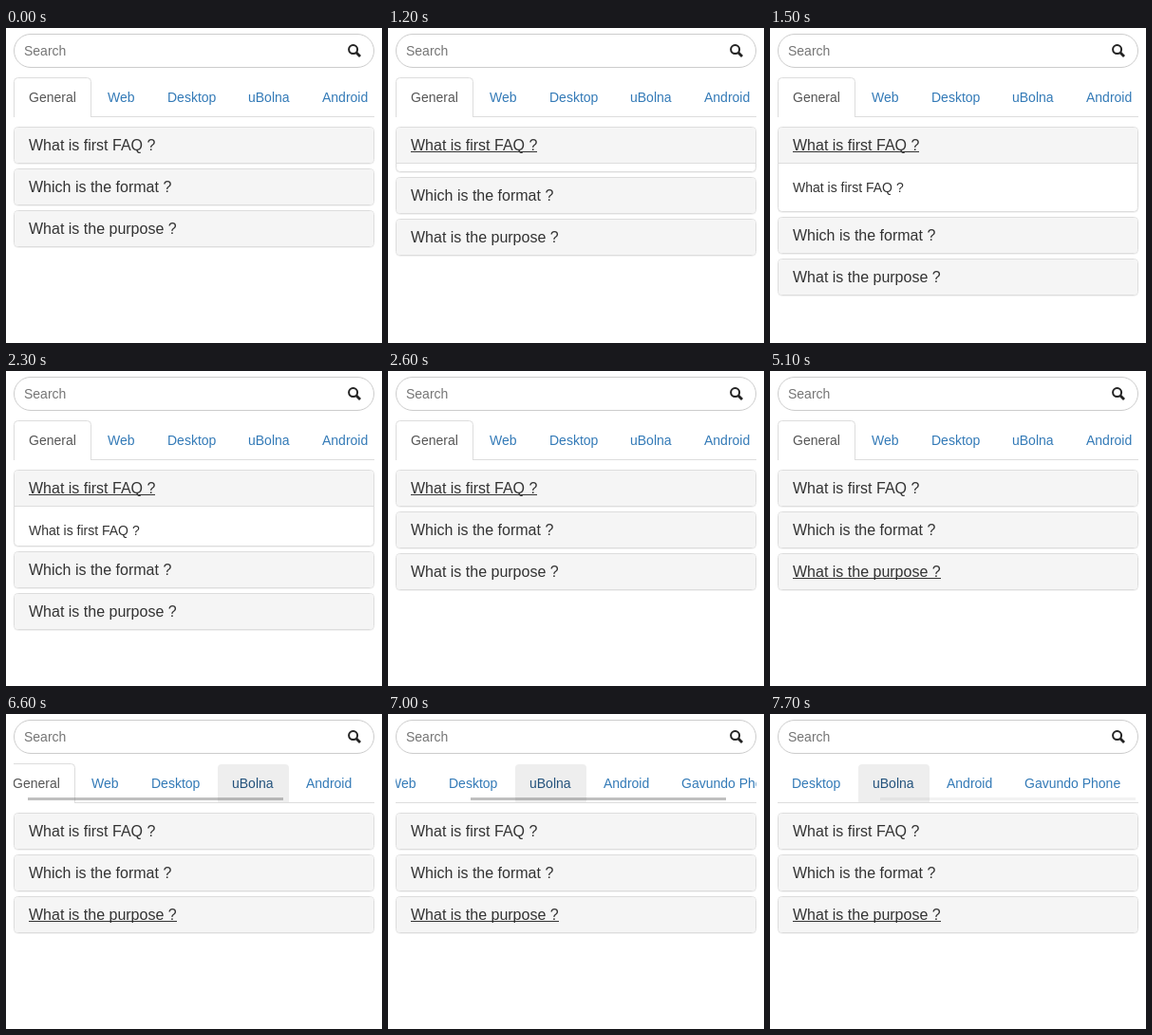
Write an HTML page with a canvas that moves like this. It is 396 px wide and 332 px high and loops after 8000 ms.

```html
<!DOCTYPE html>
<html lang="en">
<head>
<meta charset="utf-8">
<title>FAQ accordion</title>
<style>
  html, body { margin: 0; width: 100%; height: 100%; overflow: hidden; background: #fff; }
  canvas { display: block; }
</style>
</head>
<body>
<canvas id="stage" width="396" height="332"></canvas>
<script>
const ctx = document.getElementById('stage').getContext('2d');
const LOOP = 8000, STEP = 100;
const LEFT = 8, RIGHT = 388, WIDTH = RIGHT - LEFT;
const BODY_HEIGHT = 51, MAX_SCROLL = 147;
const TABS = ['General', 'Web', 'Desktop', 'uBolna', 'Android', 'Gavundo Phone'];
const QUESTIONS = ['What is first FAQ ?', 'Which is the format ?', 'What is the purpose ?'];

const clamp = v => Math.min(1, Math.max(0, v));

// CSS "ease": cubic-bezier(.25, .1, .25, 1)
function ease(x) {
  if (x <= 0 || x >= 1) return clamp(x);
  const bezier = (u, a, b) => 3 * u * (1 - u) ** 2 * a + 3 * u * u * (1 - u) * b + u ** 3;
  let lo = 0, hi = 1;
  for (let i = 0; i < 20; i++) {
    const mid = (lo + hi) / 2;
    if (bezier(mid, .25, .25) < x) lo = mid; else hi = mid;
  }
  return bezier(lo, .1, 1);
}

function text(str, x, y, size, color) {
  ctx.font = size + 'px "Liberation Sans", Arial, sans-serif';
  ctx.fillStyle = color;
  ctx.fillText(str, x, y);
  return ctx.measureText(str).width;
}

function rect(x, y, w, h, color) {
  ctx.fillStyle = color;
  ctx.fillRect(x, y, w, h);
}

function box(x, y, w, h, radius, fill, stroke) {
  ctx.beginPath();
  ctx.roundRect(x + .5, y + .5, w - 1, h - 1, radius);
  ctx.fillStyle = fill;
  ctx.fill();
  ctx.lineWidth = 1;
  ctx.strokeStyle = stroke;
  ctx.stroke();
}

function clipped(x, y, w, h, draw) {
  ctx.save();
  ctx.beginPath();
  ctx.rect(x, y, w, h);
  ctx.clip();
  draw();
  ctx.restore();
}

function drawSearch() {
  box(LEFT, 6, WIDTH, 36, 17.5, '#fff', '#ccc');
  text('Search', 19, 29, 14, '#757575');
  ctx.strokeStyle = '#222';
  ctx.lineWidth = 2;
  ctx.beginPath();
  ctx.arc(365.6, 22.6, 4.5, 0, Math.PI * 2);
  ctx.stroke();
  ctx.lineWidth = 2.8;
  ctx.beginPath();
  ctx.moveTo(369, 26);
  ctx.lineTo(373, 30);
  ctx.stroke();
}

function drawTabs(scroll, hovered, barAlpha) {
  rect(LEFT, 93, WIDTH, 1, '#ddd');
  clipped(LEFT, 52, WIDTH, 42, () => {
    let x = LEFT - scroll;
    TABS.forEach((label, i) => {
      ctx.font = '14px "Liberation Sans", Arial, sans-serif';
      const width = ctx.measureText(label).width + 32;
      const left = Math.round(x), w = Math.round(x + width) - left;
      let color = '#337ab7';
      if (i === 0) {
        box(left, 52, w, 50, 4, '#fff', '#ddd');
        color = '#555';
      } else if (i === hovered) {
        ctx.beginPath();
        ctx.roundRect(left, 53, w, 40, [4, 4, 0, 0]);
        ctx.fillStyle = '#eee';
        ctx.fill();
        color = '#23527c';
      }
      text(label, Math.floor(x + 16), 78, 14, color);
      x += width + 2;
    });
  });
  if (barAlpha > 0) {
    const barX = 11 + Math.round(scroll / MAX_SCROLL * 105);
    rect(barX, 88, 269, 3, `rgba(128,128,128,${barAlpha})`);
  }
}

function drawPanel(question, y, open, underlined) {
  const height = 39 + open;
  box(LEFT, y + 1, WIDTH, height, 4, '#fff', 'rgba(0,0,0,.05)');
  box(LEFT, y, WIDTH, height, 4, '#fff', '#ddd');
  ctx.beginPath();
  ctx.roundRect(LEFT + 1, y + 1, WIDTH - 2, 37, open ? [3, 3, 0, 0] : 3);
  ctx.fillStyle = '#f5f5f5';
  ctx.fill();
  const width = text(question, 24, y + 25, 16, '#333');
  if (underlined) rect(24, y + 26, Math.round(width), 1, '#333');
  if (open) {
    rect(LEFT + 1, y + 38, WIDTH - 2, 1, '#ddd');
    clipped(LEFT + 1, y + 39, WIDTH - 2, open - 1, () => text(question, 24, y + 69, 14, '#333'));
  }
}

function openHeight(t, openAt, closeAt) {
  const progress = start => ease(clamp((t - start + 50) / 350));
  return Math.round(BODY_HEIGHT * (progress(openAt) - progress(closeAt)));
}

function scrollAt(t) {
  const p = clamp((t - 6400) / 800);
  return Math.round(MAX_SCROLL * p * p * (1 + 1.13 * (1 - p)));
}

function draw(time) {
  const t = Math.floor(time % LOOP / STEP) * STEP;
  rect(0, 0, 396, 332, '#fff');
  drawSearch();

  const scroll = scrollAt(t);
  const hovered = t < 6200 ? -1 : t < 6400 ? 4 : 3;
  const fade = t < 7600 ? 1 : t < 7700 ? .6 : .2;
  drawTabs(scroll, hovered, scroll ? .5 * fade : 0);

  const heights = [openHeight(t, 1200, 2300), 0, openHeight(t, 3500, 4800)];
  const active = t < 1200 ? -1 : t < 3500 ? 0 : 2;
  let y = 104;
  QUESTIONS.forEach((question, i) => {
    drawPanel(question, y, heights[i], i === active);
    y += 44 + heights[i];
  });
}

const start = performance.now();
function tick() {
  draw(performance.now() - start);
  requestAnimationFrame(tick);
}
tick();
</script>
</body>
</html>
```
